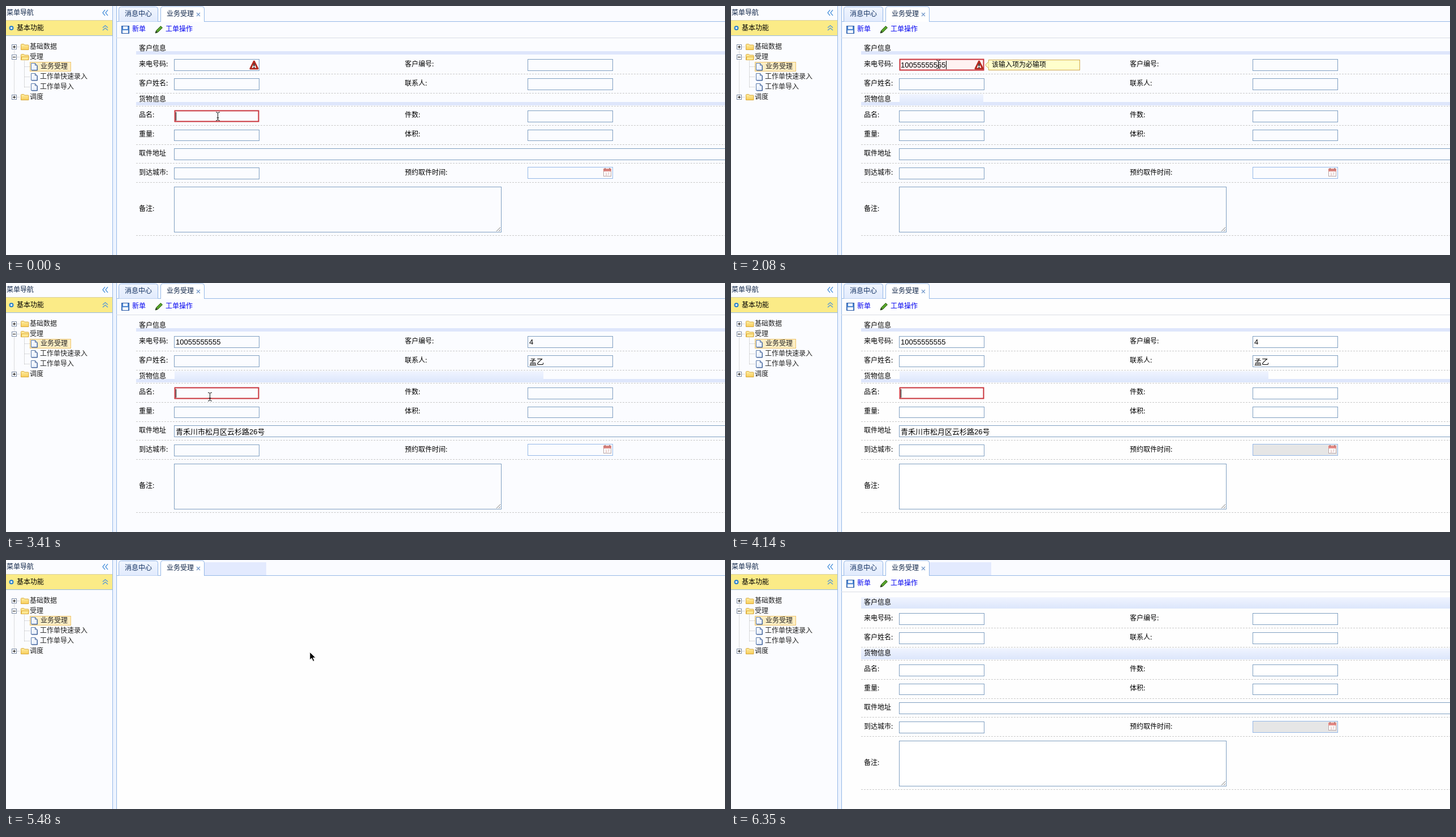
Write an HTML page with a canvas that moves like this. It is 1271 px wide and 441 px high and loops after 6710 ms.

```html
<!DOCTYPE html>
<html lang="zh-CN">
<head>
<meta charset="utf-8">
<style>
html, body { margin: 0; width: 100%; height: 100%; overflow: hidden; background: #fff; }
canvas { display: block; }
</style>
</head>
<body>
<canvas id="stage" width="1271" height="441"></canvas>
<script>
const c = document.getElementById('stage').getContext('2d');
const LOOP = 6710, W = 1271, H = 441;
const BLUE = '#95b8e7', PHONE = '10055555555', ADDRESS = '青禾川市松月区云杉路26号', CONTACT = '孟乙';
const FIELD = '#7f9fc1', RED = '#c9353c';

// Timed states: [start in ms, ...values]
const POINTER = [
  [0, 374, 195, 'beam'], [150, 372, 172, 'arrow'], [300, 368, 132, 'beam'], [440, 366, 108, 'beam'],
  [590, 366, 103, 'beam'], [2380, 365, 118, 'arrow'], [2530, 363, 150, 'arrow'], [2680, 361, 188, 'beam'],
  [2820, 360, 201, 'beam'], [3560, 600, 290, 'arrow'], [3700, 968, 399, 'arrow'], [3850],
  [4290, 884, 318, 'arrow'], [4440, 880, 70, 'arrow'], [4590, 450, 12, 'arrow'], [4740, 250, 38, 'hand'],
  [4890, 232, 43, 'hand'], [5190, 300, 70, 'arrow'], [5340, 420, 115, 'arrow'], [5480, 537, 163, 'arrow'],
  [5630, 780, 255, 'arrow'], [5780, 988, 320, 'arrow'], [5920, 1115, 380, 'arrow'],
  [6060, 1185, 418, 'arrow'], [6210, 1219, 433, 'arrow'], [6350]
];
const FOCUS = [[0, 'goods'], [590, 'phone'], [2820, 'goods'], [5340, '']];
const CARET = [[0, 1], [1190, 0], [1640, 1], [2530, 0], [2820, 1], [3110, 0], [3410, 1], [3850, 0], [4140, 1], [4590, 0], [5040, 1]];
const HEAD1 = [[0, 0], [4440, 894], [5340, W]];
const HEAD2 = [[0, 0], [300, 446], [2970, 950], [5340, W]];

const at = (list, t) => list.filter(s => s[0] <= t).pop();

function rect(x, y, w, h, fill, stroke, line = 1) {
  if (fill) { c.fillStyle = fill; c.fillRect(x, y, w, h); }
  if (stroke) {
    c.strokeStyle = stroke; c.lineWidth = line;
    c.strokeRect(x + line / 2, y + line / 2, w - line, h - line);
  }
}

function path(d, fill, stroke, line = 1, x = 0, y = 0) {
  const p = new Path2D(d);
  c.save();
  c.translate(x, y);
  if (fill) { c.fillStyle = fill; c.fill(p); }
  if (stroke) { c.strokeStyle = stroke; c.lineWidth = line; c.stroke(p); }
  c.restore();
}

// y is the middle of the line of text
function text(s, x, y, color = '#000', font = '12px "Noto Sans CJK SC", sans-serif') {
  c.font = font; c.fillStyle = color;
  c.fillText(s, x, y + 4);
}

const value = (s, x, y) => text(s, x, y + 1, '#000', '13px "Liberation Sans", "Noto Sans CJK SC", sans-serif');

function fade(y0, y1, from, to) {
  const g = c.createLinearGradient(0, y0, 0, y1);
  g.addColorStop(0, from); g.addColorStop(1, to);
  return g;
}

function dashed(d, color, pattern) {
  c.setLineDash(pattern);
  path(d, null, color);
  c.setLineDash([]);
}

function folder(x, y, open) {
  path('M.5 2.5q0-1 1-1h4l1.500 1.500h6q1 0 1 1v7.500h-13.500z', fade(0, 12, '#fff3b0', '#f7cb55'), '#d9a93c', 1, x, y - 6);
  if (open) path('M2 6h12.500l-1.500 5.500h-12z', '#ffe892', '#dcae42', 1, x, y - 6);
}

function doc(x, y) {
  path('M.5 .5h7l3.500 3.500v8.500h-10.500z', fade(0, 13, '#fff', '#e3ecfb'), '#5577aa', 1, x, y - 6);
  path('M7.500 .5v3.500h3.500M11.500 4.500v8.500h-10', null, '#3f5f96', 1, x, y - 6);
}

function toggle(y, plus) {
  rect(10, y - 4, 9, 9, '#fff', '#7b8ba5');
  rect(12, y, 5, 1, '#000');
  if (plus) rect(14, y - 2, 1, 5, '#000');
}

function sidebar() {
  rect(0, 0, 188, H, '#fbfcff');
  text('菜单导航', 1, 12, '#0e2447');
  path('M175 7l-4 5 4 5M180 7l-4 5 4 5', null, '#4f94dc', 1.3);
  rect(0, 25, 189, 28, '#fbeb87');
  rect(0, 25, 189, 1, '#d8cf9d');
  rect(0, 52, 189, 1, BLUE);
  path('M5.500 39a4 4 0 1 0 8 0a4 4 0 1 0-8 0', '#2f83c8');
  path('M7.500 39h4M9.500 37v4', null, '#fff', 1.3);
  text('基本功能', 19, 39);
  path('M171 38.500l4.500-4 4.500 4M171 43l4.500-4 4.500 4', null, '#4f94dc', 1.3);

  dashed('M14.500 76v82M32.500 97v47M19 72.500h6M19 90.500h6M19 161.500h6M33 107.500h9M33 125.500h9M33 143.500h9', '#b9b9b9', [1, 1]);
  [[72, '基础数据'], [90, '受理'], [161, '调度']].forEach(([y, s]) => {
    toggle(y, y !== 90);
    folder(26, y, y === 90);
    text(s, 42, y, '#222');
  });
  rect(42, 99, 73, 17, '#fdeec4', '#efc46b');
  ['业务受理', '工作单快速录入', '工作单导入'].forEach((s, i) => {
    doc(44, 107 + i * 18);
    text(s, i ? 60 : 61, 107 + i * 18, '#222');
  });
  rect(188, 0, 1, H, BLUE);
  rect(189, 0, 6, H, '#eef4ff');
  rect(195, 0, 1, H, BLUE);
}

function tabs(t) {
  rect(196, 0, W, 28, '#fafbff');
  if (t >= 4590) rect(351, 4, 109, 23, '#e3eafe');
  rect(195, 27, W, 1, BLUE);
  path('M199.500 27.500v-22q0-4 4-4h61q4 0 4 4v22', fade(2, 27, '#f0f5ff', '#e2ebfd'), BLUE);
  path('M273.500 28v-23q0-4 4-4h69q4 0 4 4v23', '#fff', BLUE);
  text('消息中心', 210, 14, '#0e2d5f');
  text('业务受理', 284, 14, '#0e2447');
  path('M337 12l6 6M343 12l-6 6', null, '#6f95c8', 1.2);
}

function toolbar(hover) {
  if (hover) {
    c.beginPath(); c.roundRect(198.5, 29.5, 54, 24, 4);
    c.fillStyle = '#eaf1fe'; c.fill();
    c.strokeStyle = '#bdd3f2'; c.lineWidth = 1; c.stroke();
  }
  rect(195, 56, W, 1, '#d9dde4');
  rect(204, 35, 14, 14, '#4c86d0', '#2858a5');
  rect(207, 36, 8, 5, '#e8f1ff');
  rect(206, 43, 10, 5, '#fff');
  text('新单', 223, 41, hover ? '#111' : '#0000f0');
  path('M264 48l1.500-4.500 8-8 3 3-8 8z', '#58a32c', '#2c5f17');
  path('M264 48l1.500-4 2.500 2.500z', '#333');
  text('工单操作', 282, 41, '#0000f0');
}

function heading(s, y, bottom, reach) {
  const x = reach === W ? 230 : 298;
  rect(230, bottom - 6, W, 6, '#dee6fb');
  if (reach) rect(x, y, reach - x, bottom - y, fade(y, bottom, '#f0f4ff', '#dce6fb'));
  text(s, 235, y + 9);
}

function input(x, y, fill, focused, h = 21) {
  if (focused) rect(x + .5, y - .5, 150, 21, fill, RED, 2);
  else rect(x, y, 151, h, fill, FIELD);
}

function warning() {
  c.lineJoin = 'round';
  path('M438.500 98l6.500 13h-13z', '#fff', '#b32a20', 3);
  c.lineJoin = 'miter';
  rect(437.5, 102, 2, 5, '#222');
  rect(437.5, 108, 2, 2, '#222');
}

function calendar(dim) {
  rect(1056, 288, 14, 14, '#fff', '#b9a5a5');
  rect(1056, 288, 14, 5, dim ? '#e58a85' : '#d9847f');
  rect(1058, 287, 2, 3, '#b07a78');
  rect(1066, 287, 2, 3, '#b07a78');
  text('17', 1059, 296, '#c58d89', '7px "Liberation Sans", sans-serif');
}

function form(t) {
  const fresh = t >= 5340, filled = t >= 2970 && !fresh, locked = t >= 4140;
  const focus = at(FOCUS, t)[1], caret = at(CARET, t)[1];
  const invalid = t < 2380, paper = locked ? '#fff' : '#fbfcff';

  toolbar(t >= 4740 && t < 5190);
  heading('客户信息', 66, 86, at(HEAD1, t)[1]);
  heading('货物信息', 156, 176, at(HEAD2, t)[1]);
  [120, 154, 177, 211, 245, 278, 312, 406].forEach(y => dashed(`M230 ${y}.500H${W}`, '#c9c9c9', [3, 2]));

  [['来电号码:', '客户编号:', 103], ['客户姓名:', '联系人:', 137], ['品名:', '件数:', 193], ['重量:', '体积:', 227],
   ['取件地址', '', 261], ['到达城市:', '预约取件时间:', 295], ['备注:', '', 359]].forEach(([left, right, y]) => {
    text(left, 235, y);
    text(right, 705, y);
  });

  input(297, 94, focus === 'phone' && invalid ? '#fff2f2' : paper, focus === 'phone');
  input(297, 128, paper);
  input(297, 185, paper, focus === 'goods');
  input(297, 219, paper, false, 20);
  input(297, 286, paper);
  [94, 128, 185].forEach(y => input(922, y, paper));
  input(922, 219, paper, false, 20);
  rect(297, 252, W, 21, paper, FIELD);
  rect(922, 285, 151, 21, locked ? '#e6e6e6' : paper, BLUE);
  calendar(locked);
  rect(297, 320, 579, 81, paper, FIELD);
  path('M867 399l7-7M871 399l3-3', null, '#777');

  if (invalid) warning();
  if (t >= 440 && invalid) {
    rect(455, 95, 162, 19, '#ffffcc', '#d2a94a');
    path('M455.500 98.500l-6 6 6 6', '#ffffcc', '#d2a94a');
    text('该输入项为必输项', 461, 104);
  }
  if (t >= 2080 && !fresh) value(PHONE, 300, 104);
  if (filled) {
    value('4', 925, 104);
    value(CONTACT, 925, 139);
    value(ADDRESS, 300, 263);
  }
  if (focus && caret) {
    if (focus === 'phone') rect(t < 2080 ? 300 : 380, 97, 1, 15, '#000');
    else rect(300, 188, 1, 15, '#000');
  }
}

function pointer([, x, y, kind]) {
  if (kind === 'beam') path('M-3.500-7.500q3.500 0 3.500 2v11q0 2-3.500 2M3.500-7.500q-3.500 0-3.500 2M0 5.500q0 2 3.500 2M-2 2.500h4', null, '#111', 1, x + .5, y + .5);
  if (kind === 'arrow') path('M0 0v14l3.300-3 2.500 5.500 2.500-1-2.500-5.300h4.700z', '#000', '#fff', 1, x, y);
  if (kind === 'hand') path('M-3 8l-5-7q0-2 3-.5l-2-6q0-2 2-2l2 4q0-2 2-1.500l1 1q2-1.500 3 .5q3-1 3 1.500v5l-2 5z', '#fff', '#000', 1.2, x, y);
}

function frame(now) {
  const t = now % LOOP;
  c.clearRect(0, 0, W, H);
  rect(196, 28, W, H, t < 4140 ? '#fbfcff' : '#fefefe');
  sidebar();
  tabs(t);
  if (t < 5340 || t >= 5780) form(t);
  pointer(at(POINTER, t));
  requestAnimationFrame(frame);
}
requestAnimationFrame(frame);
</script>
</body>
</html>
```
